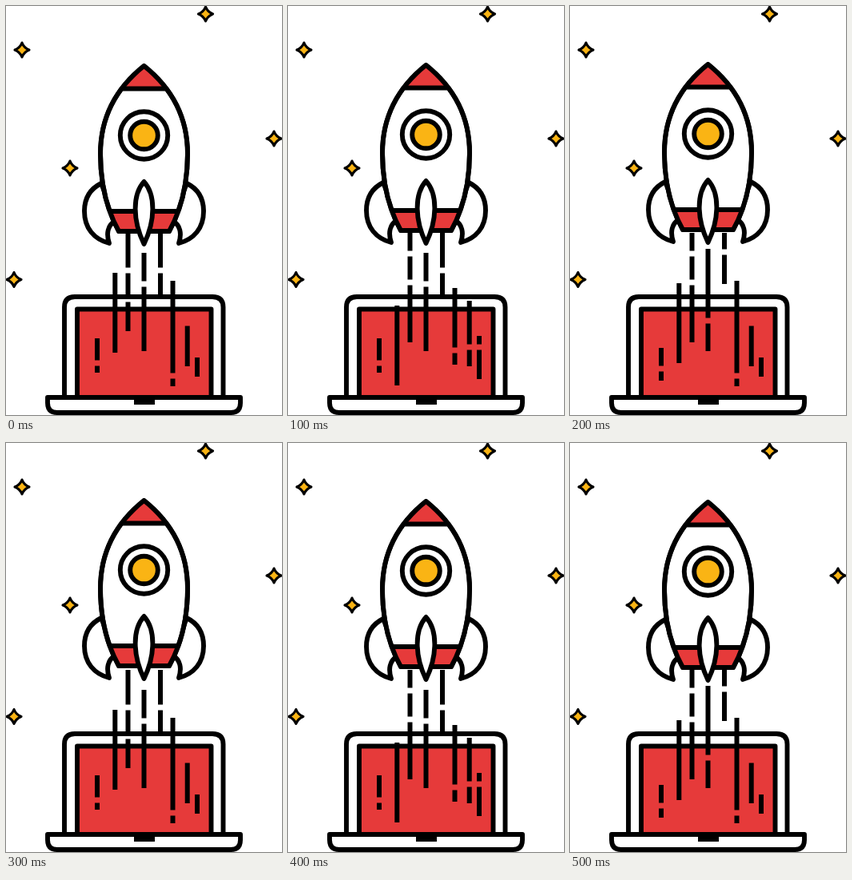
An HTML page for the animation above (0.6 s loop, 345 px wide and 512 px high).

```html
<!DOCTYPE html>
<html lang="en">
<head>
<meta charset="utf-8">
<title>Rocket launch</title>
<style>
  html, body { margin: 0; width: 100%; height: 100%; overflow: hidden; background: #fff; }
  svg { display: block; }
  .ink { stroke: #000; stroke-width: 5.9; stroke-linejoin: round; fill: #fff; }
  .red { fill: #e63a3a; }
  .gold { fill: #fab414; }
  #stars { stroke-width: 3.1; }
  #streaks { stroke: #000; stroke-width: 6; fill: none; }
</style>
</head>
<body>
<svg width="345" height="512" viewBox="0 0 345 512">
  <defs>
    <path id="star" d="M0-9Q2.5-2.5 9 0Q2.5 2.5 0 9Q-2.5 2.5-9 0Q-2.5-2.5 0-9Z"/>
    <path id="fin" d="M119 222C105 229 98 241 98 257C98 278 110 292 129 297C125 285 127 274 137 269Z"/>
    <path id="hull" d="M172.5 75C140 101 118 137 118 185C118 222 126 255 141 282H204C219 255 227 222 227 185C227 137 205 101 172.5 75Z"/>
    <clipPath id="inside"><use href="#hull"/></clipPath>
  </defs>

  <g id="stars" class="ink gold">
    <use href="#star" x="249.5" y="10"/>
    <use href="#star" x="20" y="55"/>
    <use href="#star" x="335" y="166"/>
    <use href="#star" x="80" y="203"/>
    <use href="#star" x="10" y="342.5"/>
  </g>

  <g class="ink">
    <path d="M73 490V377Q73 364 86 364H258Q271.5 364 271.5 377V490Z"/>
    <path class="red" d="M89 490V379.5H256.5V490Z"/>
    <path d="M52 490H293V497Q293 509 281 509H64Q52 509 52 497Z"/>
  </g>
  <path d="M160 490H186V499H160Z"/>

  <g id="streaks"></g>

  <g id="rocket" class="ink">
    <use href="#fin"/>
    <use href="#fin" transform="matrix(-1 0 0 1 345 0)"/>
    <use href="#hull"/>
    <g clip-path="url(#inside)">
      <path class="red" d="M110 60H235V103.5H110Z"/>
      <path class="red" d="M110 257H235V290H110Z"/>
    </g>
    <use href="#hull" fill="none"/>
    <circle cx="172.5" cy="162" r="29.7"/>
    <circle class="gold" cx="172.5" cy="162" r="17.3"/>
    <path d="M172.5 220C158 236 158 268 172.5 298C187 268 187 236 172.5 220Z"/>
  </g>
</svg>
<script>
const STEP = 100, STEPS = 6, BEAT = 3, GAP = 7;
const rocket = document.getElementById('rocket');
const layer = document.getElementById('streaks');
const columns = [];

// Ends are [middle, swing]. The ends and cuts of a column sway together
// once per beat and reach their full swing at the step called peak.
function column(x, peak, top, bottom, cutSwing = 0, ...cuts) {
  const node = document.createElementNS('http://www.w3.org/2000/svg', 'path');
  layer.append(node);
  columns.push({ node, x, peak, top, bottom, cuts: cuts.map(mid => [mid, cutSwing]) });
}

column(114, 2, [420, 8], [462, 7], 5, 449);
column(136.3, 1.15, [352, 24], [452, 24]);
column(152.5, 0, [284, 0], [416, -9], 14, 317, 353);
column(172.5, 2, [307, -3], [432, 0], 31, 363);
column(193, 2, [284, 0], [358, -10], -15, 323);
column(208.5, 1, [347, 6], [467, -18], -21, 452);
column(226.7, 1, [389, -20], [451, 0], 20, 407);
column(239, 1, [431, -18], [465, 2], 0, 427);

function streakPath({ x, peak, top, bottom, cuts }, step) {
  const wave = Math.cos(2 * Math.PI * (step - peak) / BEAT);
  const at = ([mid, swing]) => Math.round(mid + swing * wave);
  const dash = (from, to) => to - from > 1 ? `M${x} ${from}V${to}` : '';
  let from = at(top), d = '';
  for (const cut of cuts) {
    const y = at(cut);
    d += dash(from, y - GAP / 2);
    from = Math.max(from, y + GAP / 2);
  }
  return d + dash(from, at(bottom));
}

function draw(time) {
  const step = Math.floor(time / STEP) % STEPS;
  const lift = STEPS / 2 - Math.abs(step - STEPS / 2);
  rocket.setAttribute('transform', `translate(0 ${-lift})`);
  for (const c of columns) c.node.setAttribute('d', streakPath(c, step));
}

const start = performance.now();
function tick() {
  draw(performance.now() - start);
  requestAnimationFrame(tick);
}
tick();
</script>
</body>
</html>
```
